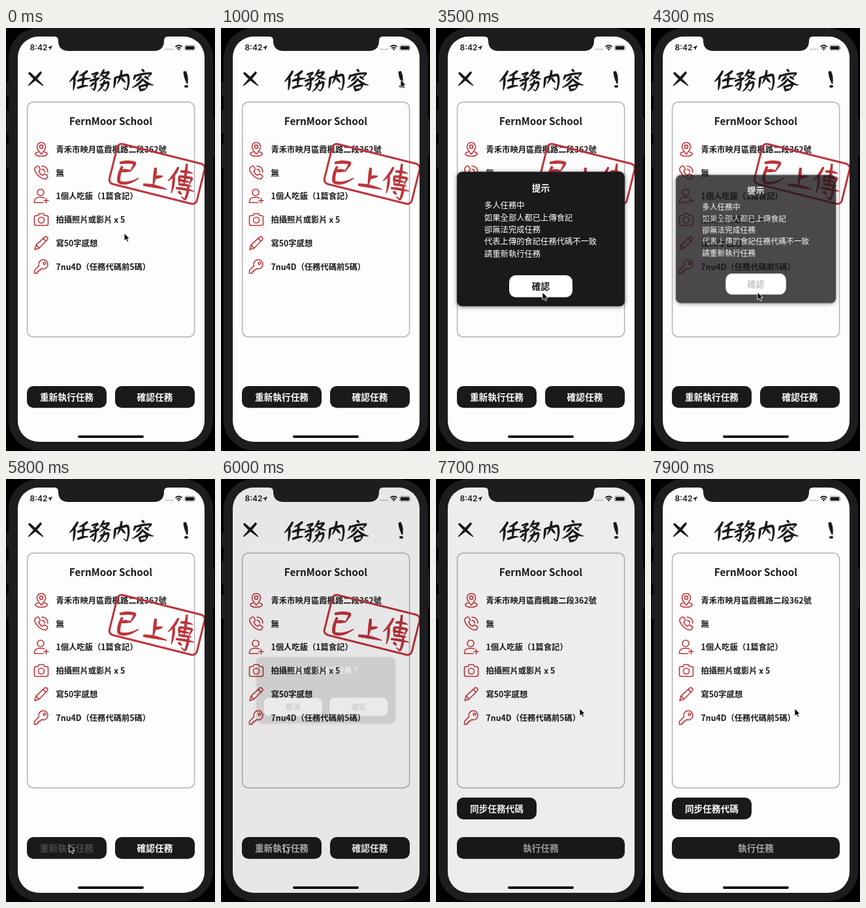
An HTML page that plays this animation: 320x645 px, repeating every 8 s.

```html
<!DOCTYPE html>
<html lang="zh-Hant">
<head>
<meta charset="utf-8">
<title>任務內容</title>
<style>
html, body { margin: 0; width: 100%; height: 100%; overflow: hidden; background: #000; }
svg { display: block; width: 320px; height: 645px; }
text { font: 700 13.7px "Noto Sans CJK TC", "Noto Sans CJK JP", "Noto Sans CJK", sans-serif; fill: #1b191c; }
.mid { text-anchor: middle; }
.light { fill: #fff; }
.item { font-size: 12.3px; }
.name { font-size: 15.25px; }
.body { font-size: 12.3px; font-weight: 400; fill: #fff; }
.time { font: 600 12px Inter, "Liberation Sans", sans-serif; }
.dark { fill: #1b191c; }
.white { fill: #fff; }
.icon { fill: none; stroke: #c0353b; stroke-width: 1.6; stroke-linejoin: round; stroke-linecap: round; }
.dialog { filter: drop-shadow(0 1px 3px rgba(0, 0, 0, .55)); transform-origin: 160.5px 322px; }

.dialog, .dim, .before, .after, .press, #cursor { animation: 8s linear infinite; }
#cursor { animation-name: move; }
.notice { animation-name: notice; }
.confirm { animation-name: confirm; }
.dim { animation-name: dim; }
.before { animation-name: before; animation-timing-function: step-end; }
.after { animation-name: after; animation-timing-function: step-end; }
.ok { animation-name: ok; }
.redo { animation-name: redo; }
.yes { animation-name: yes; }

@keyframes move {
  0%, 1% { transform: translate(181px, 313px); animation-timing-function: ease-in-out; }
  11%, 27% { transform: translate(275px, 79px); animation-timing-function: ease-in; }
  33.75% { transform: translate(256px, 192px); animation-timing-function: ease-out; }
  41%, 57% { transform: translate(163px, 403px); animation-timing-function: ease-in-out; }
  66.5%, 79.5% { transform: translate(97px, 558px); animation-timing-function: ease-in-out; }
  86.25% { transform: translate(211px, 380px); animation-timing-function: ease-out; }
  90%, 100% { transform: translate(220px, 350px); }
}
@keyframes notice {
  0%, 16% { opacity: 0; transform: scale(.8); }
  20%, 53.125% { opacity: 1; transform: none; }
  56.25%, 100% { opacity: 0; transform: scale(.77); }
}
@keyframes confirm {
  0%, 74.5% { opacity: 0; transform: scale(.8); }
  78.5%, 93% { opacity: 1; transform: none; }
  96.25%, 100% { opacity: 0; transform: scale(.77); }
}
@keyframes dim {
  0%, 74% { opacity: 0; }
  78%, 93% { opacity: .34; }
  97%, 100% { opacity: 0; }
}
@keyframes before { 0% { opacity: 1; } 94% { opacity: 0; } 100% { opacity: 0; } }
@keyframes after { 0% { opacity: 0; } 94% { opacity: 1; } 100% { opacity: 1; } }
@keyframes ok { 0%, 49% { fill: #1b191c; } 50.5%, 56.3% { fill: #b5b5b5; } 57%, 100% { fill: #1b191c; } }
@keyframes redo { 0%, 69% { fill: #fff; } 70%, 73.5% { fill: #4a484b; } 76%, 100% { fill: #fff; } }
@keyframes yes { 0%, 91% { fill: #1b191c; } 92%, 96.3% { fill: #b5b5b5; } 97%, 100% { fill: #1b191c; } }
</style>
</head>
<body>
<svg viewBox="0 0 320 645">
  <defs>
    <clipPath id="screen"><rect x="18" y="13" width="286" height="618" rx="32"/></clipPath>
  </defs>

  <!-- phone -->
  <g fill="#1d1c1e">
    <rect x="1" y="82" width="5" height="22" rx="1.5"/>
    <rect x="1" y="125" width="5" height="36" rx="1.5"/>
    <rect x="1" y="176" width="5" height="37" rx="1.5"/>
    <rect x="314" y="137" width="5" height="60" rx="1.5"/>
    <rect x="4" y="0" width="313" height="644" rx="46"/>
  </g>

  <g clip-path="url(#screen)">
    <rect x="18" y="13" width="286" height="618" fill="#fdfdfd"/>

    <!-- status bar -->
    <text class="time" x="36.5" y="34.3">8:42</text>
    <path class="dark" d="M71 26.5L67.6 34.2L67 30.6L63.4 30Z"/>
    <g fill="#bbb">
      <circle cx="244.5" cy="32.5" r="1.2"/><circle cx="248" cy="32.5" r="1.2"/>
      <circle cx="251.5" cy="32.5" r="1.2"/><circle cx="255" cy="32.5" r="1.2"/>
    </g>
    <g fill="none" stroke="#1b191c" stroke-width="1.7">
      <path d="M259.3 28.7Q264.5 24.3 269.7 28.7M261.3 31Q264.5 28.3 267.7 31"/>
    </g>
    <path class="dark" d="M262.7 32.2Q264.5 30.8 266.3 32.2L264.5 34.2Z"/>
    <rect x="273.5" y="26.2" width="16" height="8" rx="2.4" fill="none" stroke="#999" stroke-width=".8"/>
    <rect class="dark" x="274.7" y="27.4" width="13.6" height="5.6" rx="1.3"/>
    <path d="M290.4 28.8Q291.8 30.2 290.4 31.6Z" fill="#999"/>

    <!-- header -->
    <g id="head" class="dark"></g>
    <ellipse class="dark" cx="276" cy="89" rx="3" ry="1.9"/>

    <!-- card -->
    <rect x="32.6" y="113" width="256" height="358" rx="9" fill="none" stroke="#b2b1b3" stroke-width="1.5"/>
    <text class="mid name" x="160.5" y="147.6">FernMoor School</text>
    <g id="items"></g>

    <g class="before">
      <rect x="-69" y="-31.5" width="138" height="63" rx="7" fill="none" stroke="#bd353b" stroke-width="3" transform="translate(231.3 222.5) rotate(14)"/>
      <g id="stamp" fill="#bd353b"></g>
      <rect class="dark" x="32" y="546" width="122" height="33.3" rx="10"/>
      <rect class="dark" x="167" y="546" width="122" height="33.3" rx="10"/>
      <text class="mid light press redo" x="93" y="568">重新執行任務</text>
      <text class="mid light" x="228" y="568">確認任務</text>
    </g>

    <g class="after">
      <rect class="dark" x="32" y="485.7" width="122" height="33.3" rx="10"/>
      <rect class="dark" x="32" y="546" width="257" height="33.3" rx="10"/>
      <text class="mid light" x="93" y="507.7">同步任務代碼</text>
      <text class="mid" x="160.5" y="568" style="fill:#a3a2a4">執行任務</text>
    </g>

    <rect x="110" y="621.3" width="101" height="3.6" rx="1.8" fill="#000"/>
    <rect class="dim" x="18" y="13" width="286" height="618" fill="#000"/>

    <!-- dialogs -->
    <g class="dialog notice">
      <rect class="dark" x="32" y="219.3" width="257" height="205" rx="8"/>
      <text class="mid light" x="160.5" y="248.8">提示</text>
      <g id="lines"></g>
      <rect class="white" x="112" y="377" width="97" height="33.5" rx="10"/>
      <text class="mid press ok" x="160.5" y="399">確認</text>
    </g>
    <g class="dialog confirm">
      <rect class="dark" x="32" y="261" width="257" height="122" rx="8"/>
      <text class="mid light" x="160.5" y="290">確定重新執行任務？</text>
      <rect class="white" x="45.5" y="336" width="108.5" height="33.5" rx="10"/>
      <rect class="white" x="167" y="336" width="108.5" height="33.5" rx="10"/>
      <text class="mid" x="99.5" y="358">取消</text>
      <text class="mid press yes" x="221.5" y="358">確定</text>
    </g>
  </g>

  <!-- notch -->
  <path d="M74 12H248V13Q242 13 242 19Q242 35 226 35H96Q80 35 80 19Q80 13 74 13Z" fill="#1d1c1e"/>

  <path id="cursor" d="M0 0V11.5L2.7 9L4.6 13.2L6.6 12.3L4.8 8.2H8.4Z" fill="#000" stroke="#fff" stroke-width=".9"/>
</svg>

<script>
const $ = id => document.getElementById(id);

function add(parent, tag, attrs, text) {
  const el = document.createElementNS("http://www.w3.org/2000/svg", tag);
  for (const k in attrs) el.setAttribute(k, attrs[k]);
  if (text) el.textContent = text;
  return parent.appendChild(el);
}

// Turns a centre line into a tapered brush stroke.
function brush(parent, width, d) {
  const el = add(parent, "path", { d });
  const len = el.getTotalLength(), n = 28, left = [], right = [];
  for (let i = 0; i <= n; i++) {
    const t = i / n, p = el.getPointAtLength(t * len);
    const a = el.getPointAtLength(Math.max(0, t * len - 0.6));
    const b = el.getPointAtLength(Math.min(len, t * len + 0.6));
    const ang = Math.atan2(b.y - a.y, b.x - a.x);
    const r = width / 2 * (0.3 + 0.7 * Math.sin(Math.PI * (0.22 + 0.78 * t)));
    const dx = -Math.sin(ang) * r, dy = Math.cos(ang) * r;
    left.push(`${(p.x + dx).toFixed(2)} ${(p.y + dy).toFixed(2)}`);
    right.unshift(`${(p.x - dx).toFixed(2)} ${(p.y - dy).toFixed(2)}`);
  }
  el.setAttribute("d", `M${left.concat(right).join("L")}Z`);
}

const write = (id, width, strokes) => strokes.forEach(d => brush($(id), width, d));

// close and help marks
write("head", 4.2, ["M35 68Q44 77 57 88", "M54 67Q44 79 34 88"]);
write("head", 5.6, ["M273.5 66Q276 75 277.5 85"]);

// 任
write("head", 3.8, [
  "M110 65Q106 74 97 82", "M105 75Q105 84 103 95", "M125 65Q119 71 112 73",
  "M109 81Q118 77 130 77", "M119 71Q118 80 117 90", "M109 92Q116 88 126 88"
]);
// 務
write("head", 3.3, [
  "M131 71L141 68Q138 72 134 75", "M134 73L138 76", "M128 81L143 76Q140 79 138 81",
  "M137 78Q138 87 135 95L131 91", "M135 83Q132 87 128 89",
  "M150 63Q148 69 143 74", "M148 69L158 67Q153 75 143 81", "M147 72Q153 77 161 78",
  "M144 87L157 82Q157 91 152 96L148 93", "M151 79Q149 90 140 97"
]);
// 內
write("head", 3.7, [
  "M167 75Q167 84 165 92", "M167 76L186 71Q190 80 185 95L180 91",
  "M177 64Q176 77 170 85", "M177 76Q180 81 183 83"
]);
// 容
write("head", 3.5, [
  "M208 63L212 67", "M198 71Q198 74 195 79", "M198 73Q211 69 223 69Q219 73 216 76",
  "M207 73Q204 78 199 81", "M212 74Q216 76 219 79", "M210 77Q204 86 193 91",
  "M210 79Q217 86 226 87", "M204 88Q205 92 206 97", "M205 89L217 86Q215 91 213 94", "M206 95L214 93"
]);

// 已上
write("stamp", 5, [
  "M174 206Q186 203 198 206Q194 213 190 219", "M177 218Q184 217 191 218",
  "M178 211Q171 226 173 235Q185 240 203 229",
  "M229 213Q228 228 225 241", "M228 228Q234 227 240 226", "M210 239Q226 240 246 246"
]);
// 傳
write("stamp", 4.1, [
  "M264 212Q259 224 248 233", "M257 225Q257 240 253 252", "M267 219Q276 218 286 222",
  "M277 207Q275 225 272 241", "M266 225Q265 231 265 237", "M266 226L285 229Q283 234 280 239",
  "M266 232L281 235", "M264 238L284 241", "M260 244Q272 245 288 249",
  "M279 241Q279 252 274 262L268 257", "M264 249L269 254"
]);

const ring = (x, y, r) => `M${x - r} ${y}a${r} ${r} 0 1 0 ${2 * r} 0a${r} ${r} 0 1 0 ${-2 * r} 0`;

const items = [
  ["青禾市映月區霞楓路二段362號",
    "M0 8C-3 4-6.5 1-6.5-3.5A6.5 6.5 0 0 1 6.5-3.5C6.5 1 3 4 0 8Z" + ring(0, -3.5, 2.6) +
    "M-5 4.5Q-10 6-9 8.2Q-7 11 0 11Q7 11 9 8.2Q10 6 5 4.5"],
  ["無",
    "M-9-8L-6-10Q-4.5-10.5-3.6-9L-1.8-5.5Q-1.4-4.2-2.4-3.3L-4-2Q-2 2.5 2 4.5L3.4 2.8Q4.3 1.8 5.6 2.4" +
    "L9 4.4Q10.3 5.2 9.6 6.6L7.8 9.4Q5 11-1 7.5Q-8 3-10-3.5Q-10.6-6.5-9-8Z" +
    "M1-5Q5.2-4.6 5.4-.5M1-9.8Q9.6-9.4 10-.5"],
  ["1個人吃飯（1篇食記）",
    ring(-1, -5.5, 5) + "M3 10H-10.5V8Q-10 2.5-4 2H1Q3 2 4.5 3M7.5 3.5V10.5M4 7H11"],
  ["拍攝照片或影片 x 5",
    "M-8-6H-5L-3.5-9H3.5L5-6H8Q10.5-6 10.5-3.5V6.5Q10.5 9 8 9H-8Q-10.5 9-10.5 6.5V-3.5Q-10.5-6-8-6Z" +
    ring(0, 1, 4.5)],
  ["寫50字感想",
    "M-10 10L-8 3L5.5-9.5Q7-10.5 8.5-9L9.5-8Q10.5-6.5 9.5-5.2L-3.5 7.8ZM3-7L7.3-2.8M-8 3L-3.5 7.8"],
  ["7nu4D（任務代碼前5碼）",
    "M-3.6-1.2L-10.5 6V10.5H-6.5V8H-4V5.5H-1.5L.5 3.1A7 7 0 1 0-3.6-1.2Z" + ring(5, -5, 1.8)]
];
items.forEach(([label, d], i) => {
  const y = 185 + i * 35.85;
  add($("items"), "path", { d, class: "icon", transform: `translate(54 ${y - 0.5})` });
  add($("items"), "text", { class: "item", x: 76.5, y: y + 4.7 }, label);
});

["多人任務中", "如果全部人都已上傳食記", "卻無法完成任務", "代表上傳的食記任務代碼不一致", "請重新執行任務"]
  .forEach((s, i) => add($("lines"), "text", { class: "body", x: 74, y: 275.4 + i * 18.3 }, s));
</script>
</body>
</html>
```
